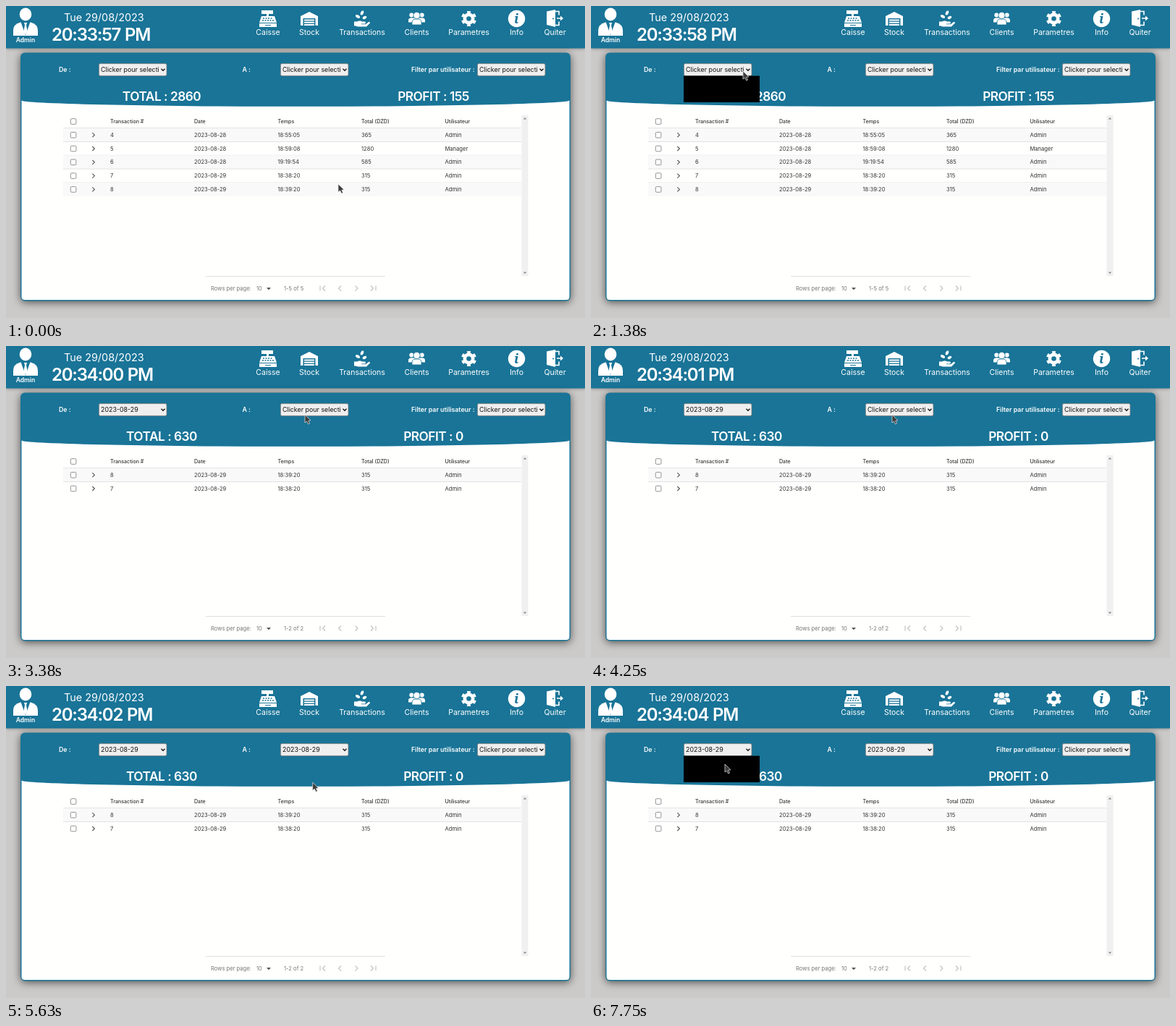
Animation, 800 px wide and 431 px high, one loop 8000 ms. Source, as an HTML page:

```html
<!DOCTYPE html>
<html lang="fr">
<head>
<meta charset="utf-8">
<title>Transactions</title>
<style>
  html, body { margin: 0; width: 100%; height: 100%; overflow: hidden; background: #cbcac8; }
  svg { display: block; width: 800px; height: 431px; font-family: Inter, "Open Sans", sans-serif; }
  .blue { fill: #197497; }
  .white { fill: #fff; }
  .nav { font-size: 10.5px; text-anchor: middle; }
  .clock { font-size: 24px; font-weight: 600; letter-spacing: -1.25px; word-spacing: 1px; }
  .label { font-size: 8.8px; font-weight: 600; }
  .sum { font-size: 17.3px; font-weight: 600; letter-spacing: -.5px; text-anchor: middle; }
  .field { font-size: 8.9px; fill: #111; }
  .head { font-size: 7.1px; font-weight: 500; fill: #333; }
  .cell { font-size: 7.6px; fill: #333; }
  .pager { font-size: 7.6px; fill: #777; }
  .line { fill: none; stroke: #fff; stroke-width: 1.6; }
  .box { fill: #fff; stroke: #777; stroke-width: .8; }
</style>
</head>
<body>
<svg viewBox="0 0 800 431">
  <rect width="800" height="58.5" class="blue" style="filter:drop-shadow(0 1px 2px #0004)"/>

  <g class="white">
    <ellipse cx="27" cy="11.5" rx="8.3" ry="9"/>
    <path d="M10 41v-7q0-9 10-11.500h14q10 2.500 10 11.500v7z"/>
    <path class="blue" d="M20.500 22 27 40.500 33.500 22z"/>
    <path d="M25 23h4l-1 3.500 1.700 9-2.700 4-2.700-4 1.700-9z"/>
    <text x="27" y="49.700" font-size="8.600" font-weight="600" text-anchor="middle">Admin</text>
    <text x="80" y="20.500" font-size="14.400">Tue 29/08/2023</text>
    <text id="clock" class="clock" x="63" y="47.500"></text>
  </g>
  <g id="nav" class="white"></g>

  <g class="white">
    <path d="M353 6h16v5h-6v3h8l3 9h-24l3-9h7v-3h-7zM350 24h24v5h-24z"/>
    <path d="M355 17h14M354 20h16" stroke="#197497" stroke-width="1.500" stroke-dasharray="2 1.500"/>
    <path d="M358 26.500h8" stroke="#197497"/>

    <path d="M407 14 419 8l12 6v13h-3.500V17h-17v10H407zM412 18.500h14v2h-14zM412 21.700h14v2h-14zM412 25h14v2h-14z"/>

    <path d="M481 21.500h4q4-2 7 0h4q2 1.500 0 3h-5v.8h6l4-3.300q2.500-.5 2 1.500l-5 5h-12l-3-1h-2z"/>
    <ellipse cx="486" cy="14.500" rx="3.300" ry="1.900" transform="rotate(30 486 14.500)"/>
    <ellipse cx="492" cy="9.500" rx="2" ry="3.200" transform="rotate(25 492 9.500)"/>
    <ellipse cx="495.500" cy="16" rx="3" ry="1.900" transform="rotate(-25 495.500 16)"/>

    <circle cx="560.300" cy="12.500" r="3"/><circle cx="574.700" cy="12.500" r="3"/>
    <path d="M556 22.500v-2.500q0-3.500 3.500-3.500h16q3.500 0 3.500 3.500v2.500z"/>
    <path d="M561 26v-3q0-5 5-5h3q5 0 5 5v3z" stroke="#197497" stroke-width=".8"/>
    <circle cx="567.500" cy="13" r="4.600" stroke="#197497" stroke-width=".8"/>

    <circle cx="639.500" cy="17.500" r="8"/>
    <circle cx="639.500" cy="17.500" r="8.800" fill="none" stroke="#fff" stroke-width="3.600" pathLength="12" stroke-dasharray="1 1" transform="rotate(15 639.500 17.500)"/>
    <circle class="blue" cx="639.500" cy="17.500" r="3.300"/>

    <circle cx="705.500" cy="17.500" r="11.700"/>
    <text class="blue" x="705.300" y="24" text-anchor="middle" font-size="18" font-style="italic" font-weight="700" font-family="Noto Serif, serif">i</text>

    <path d="M747 7.500 759 5v24l-12-3z"/>
    <circle class="blue" cx="756" cy="17.500" r="1"/>
    <path class="line" d="M759 7.500h5v5M764 21.500v5h-5M761 17h6"/>
    <path d="M766 13.500 770 17l-4 3.500z"/>
  </g>

  <rect x="20" y="64.500" width="760" height="343" rx="6" class="blue" style="filter:drop-shadow(0 2px 6px #0009)"/>
  <path fill="#fffffe" d="M21.500 130.300A378.500 8.500 0 0 0 778.500 130.300V401.500q0 4.500-4.500 4.500H26q-4.500 0-4.500-4.500z"/>

  <g class="white">
    <text class="label" x="73" y="91.300">De :</text>
    <text class="label" x="326.500" y="91.300">A :</text>
    <text class="label" x="647.500" y="91.300" text-anchor="end">Filter par utilisateur :</text>
    <text id="total" class="sum" x="215" y="130.500"></text>
    <text id="profit" class="sum" x="590.500" y="130.500"></text>
  </g>
  <g id="fields"></g>
  <g id="header"></g>
  <g id="rows"></g>

  <rect x="712.500" y="151" width="9" height="222" fill="#f0f0f0"/>
  <path d="M714.800 156.500h4.400l-2.200-2.500zM714.800 367.500h4.400l-2.200 2.500z" fill="#888"/>

  <path d="M276 373.500H524" stroke="#e0e0e0"/>
  <g class="pager">
    <text x="283" y="392.500">Rows per page:</text>
    <text x="346" y="393">10</text>
    <path d="M360 389h6l-3 3.200z" fill="#555"/>
    <text id="range" x="384" y="392.500"></text>
  </g>
  <path d="M434 386.500v7M441 386.500l-3.500 3.500 3.500 3.500M463 386.500l-3.500 3.500 3.500 3.500M482.500 386.500l3.500 3.500-3.500 3.500M504 386.500l3.500 3.500-3.500 3.500M511 386.500v7" fill="none" stroke="#c0c0c0" stroke-width="1.100"/>

  <rect id="menu" y="96.500" width="105" height="36.500"/>
  <path id="cursor" d="M0 0V11l2.600-2 2 4 2-1-1.800-3.700 3.200-.5z" fill="#3c3c3c" stroke="#e8e8e8" stroke-width=".7"/>
</svg>
<script>
const LOOP = 8000, STEP = 125, ROW_TOP = 168.7, ROW_H = 18.8;
const COLUMNS = [144, 260, 375.5, 491, 606.5];
const SALES = [
  [4, "2023-08-28", "18:55:05", 365, "Admin"],
  [5, "2023-08-28", "18:59:08", 1280, "Manager"],
  [6, "2023-08-28", "19:19:54", 585, "Admin"],
  [7, "2023-08-29", "18:38:20", 315, "Admin"],
  [8, "2023-08-29", "18:39:20", 315, "Admin"]
];
const DAY = "2023-08-29", PROMPT = "Clicker pour selecti";

// Pointer path: time, x, y
const PATH = [
  [0, 459, 246], [875, 210, 94], [1125, 210, 90], [1375, 210, 90], [2000, 211, 124],
  [2875, 211, 124], [3375, 413, 95], [4000, 413, 95], [4375, 417, 95], [4625, 419, 97],
  [4875, 421, 111], [5250, 421, 124], [5500, 421, 124], [6000, 438, 183], [6375, 438, 183],
  [6875, 180, 79], [7250, 184, 88], [7500, 222, 116], [7750, 185, 108], [8000, 185, 108]
];
// Open menus: start, end, x
const MENUS = [[1375, 2750, 128], [4625, 5500, 379], [7250, 8000, 128]];

const $ = id => document.getElementById(id);
const text = (cls, x, y, s) => `<text class="${cls}" x="${x}" y="${y}">${s}</text>`;
const checkbox = y => `<rect class="box" x="89.3" y="${y - 3.8}" width="7.6" height="7.6" rx="1.3"/>`;

const NAV = { Caisse: 362, Stock: 419, Transactions: 492, Clients: 567.5, Parametres: 639.5, Info: 705.5, Quiter: 758.5 };
$("nav").innerHTML = Object.entries(NAV).map(([name, x]) => text("nav", x, 40, name)).join("");
$("header").innerHTML = checkbox(159.5) +
  ["Transaction #", "Date", "Temps", "Total (DZD)", "Utilisateur"]
    .map((s, i) => text("head", COLUMNS[i], 162, s)).join("") +
  `<path d="M79 168.500H712" stroke="#dcdcdc"/>`;

const field = (x, value) => `
  <rect x="${x + .4}" y="79.6" width="93.6" height="16.8" rx="2" fill="#efefef" stroke="#767676" stroke-width=".8"/>
  ${text("field", x + 3, 91.3, value)}
  <path d="M${x + 86.5} 86.700l2.500 2.600 2.500-2.600" fill="none" stroke="#111" stroke-width="1.300"/>`;

function row(sale, i, count, hovered) {
  const top = ROW_TOP + i * ROW_H, mid = top + 9.5;
  const shade = i % 2 === 0 || i === hovered ? "#f9f9f9" : "none";
  return `<rect x="79" y="${top}" width="633.5" height="${ROW_H}" fill="${shade}"/>` +
    (i < count - 1 ? `<path d="M79 ${top + ROW_H}H712" stroke="#dedede" stroke-width=".8"/>` : "") +
    checkbox(mid) +
    `<path d="M119.300 ${mid - 3}l3.100 3-3.100 3" fill="none" stroke="#555" stroke-width="1.100"/>` +
    sale.map((s, c) => text("cell", COLUMNS[c], mid + 2.6, s)).join("");
}

function pointerAt(t) {
  const n = PATH.findIndex(p => p[0] > t);
  const [t0, x0, y0] = PATH[n - 1], [t1, x1, y1] = PATH[n];
  const k = (t - t0) / (t1 - t0), e = k * k * (3 - 2 * k);
  return [x0 + (x1 - x0) * e, y0 + (y1 - y0) * e];
}

function render(t) {
  const sec = 57 + Math.floor(t / 1000);
  $("clock").textContent = `20:${sec < 60 ? 33 : 34}:${String(sec % 60).padStart(2, "0")} PM`;

  const filtered = t >= 3000;
  const sales = filtered ? SALES.filter(s => s[1] === DAY).reverse() : SALES;
  $("total").textContent = "TOTAL : " + sales.reduce((sum, s) => sum + s[3], 0);
  $("profit").textContent = "PROFIT : " + (filtered ? 0 : 155);
  $("range").textContent = `1-${sales.length} of ${sales.length}`;
  $("fields").innerHTML = field(128, filtered ? DAY : PROMPT) +
    field(379, t >= 5625 ? DAY : PROMPT) + field(651, PROMPT);

  const [x, y] = pointerAt(t);
  const hovered = Math.floor((y - ROW_TOP) / ROW_H);
  $("rows").innerHTML = sales.map((s, i) => row(s, i, sales.length, hovered)).join("");

  const menu = MENUS.find(([from, to]) => t >= from && t < to);
  $("menu").setAttribute("visibility", menu ? "visible" : "hidden");
  if (menu) $("menu").setAttribute("x", menu[2]);
  $("cursor").setAttribute("transform", `translate(${x} ${y})`);
}

let shown = -1;
function tick() {
  const t = Math.floor(performance.now() % LOOP / STEP) * STEP;
  if (t !== shown) render(shown = t);
  requestAnimationFrame(tick);
}
tick();
</script>
</body>
</html>
```
